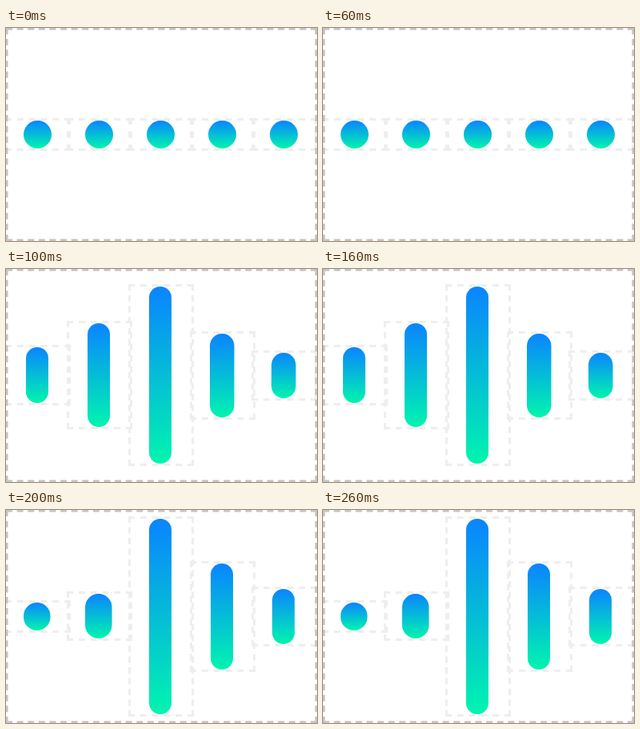
Animation of 389 by 267 pixels, one loop 300 ms. Source, as an HTML page with a canvas:

```html
<!DOCTYPE html>
<html lang="en">
<head>
<meta charset="utf-8">
<title>Sound bars</title>
<style>
html, body { margin: 0; width: 100%; height: 100%; overflow: hidden; background: #fff; }
canvas { display: block; }
</style>
</head>
<body>
<canvas id="stage" width="389" height="267"></canvas>
<script>
const W = 389, H = 267, STEP = 100;
const PITCH = 77, FIRST = 39, MID = 133.3;
const DOT = 35, SLIM = 28, PAD = 3;
const DASH = 8, GAP = 5.5;
const ctx = document.getElementById('stage').getContext('2d');

// Bar heights, and the widths of the left pair, middle bar and right pair
const poses = [
  { heights: Array(5).fill(DOT), widths: [DOT, DOT, DOT] },
  { heights: [70, 130, 222, 105, 57], widths: [SLIM, SLIM, 30.5] },
  { heights: [DOT, 56, 245, 133, 69], widths: [33.5, SLIM, SLIM] }
];

function dashLine(x1, y1, x2, y2) {
  const len = Math.hypot(x2 - x1, y2 - y1);
  // Fit whole dashes so that both corners are solid
  const n = Math.max(1, Math.floor((len - DASH) / (DASH + GAP)));
  ctx.setLineDash([DASH, (len - DASH * (n + 1)) / n]);
  ctx.beginPath();
  ctx.moveTo(x1, y1);
  ctx.lineTo(x2, y2);
  ctx.stroke();
}

function dashBox(x, y, w, h, line, color) {
  const k = line / 2;
  ctx.lineWidth = line;
  ctx.strokeStyle = color;
  for (const ly of [y + k, y + h - k]) dashLine(x, ly, x + w, ly);
  for (const lx of [x + k, x + w - k]) dashLine(lx, y, lx, y + h);
}

function drawBar(x, y, w, h) {
  const fill = ctx.createLinearGradient(0, y, 0, y + h);
  fill.addColorStop(0, '#0a84ff');
  fill.addColorStop(1, '#00f5ae');
  ctx.fillStyle = fill;
  ctx.beginPath();
  ctx.roundRect(x, y, w, h, w / 2);
  ctx.fill();
}

function draw({ heights, widths }) {
  ctx.fillStyle = '#fff';
  ctx.fillRect(0, 0, W, H);
  const bars = heights.map((h, i) => {
    const w = widths[Math.sign(i - 2) + 1];
    const x = Math.round(FIRST + PITCH * i - w / 2);
    return [x, Math.round(MID - h / 2), w, h];
  });
  bars.forEach(([, y, , h], i) =>
    dashBox(PITCH * i - 1, y - PAD, PITCH + 5, h + 2 * PAD, 3, '#eee'));
  dashBox(0, 0, W, H, 2.5, '#c4c4c4');
  bars.forEach(bar => drawBar(...bar));
}

const start = performance.now();
function tick() {
  const t = performance.now() - start;
  draw(poses[Math.floor(t / STEP) % poses.length]);
  requestAnimationFrame(tick);
}
tick();
</script>
</body>
</html>
```
